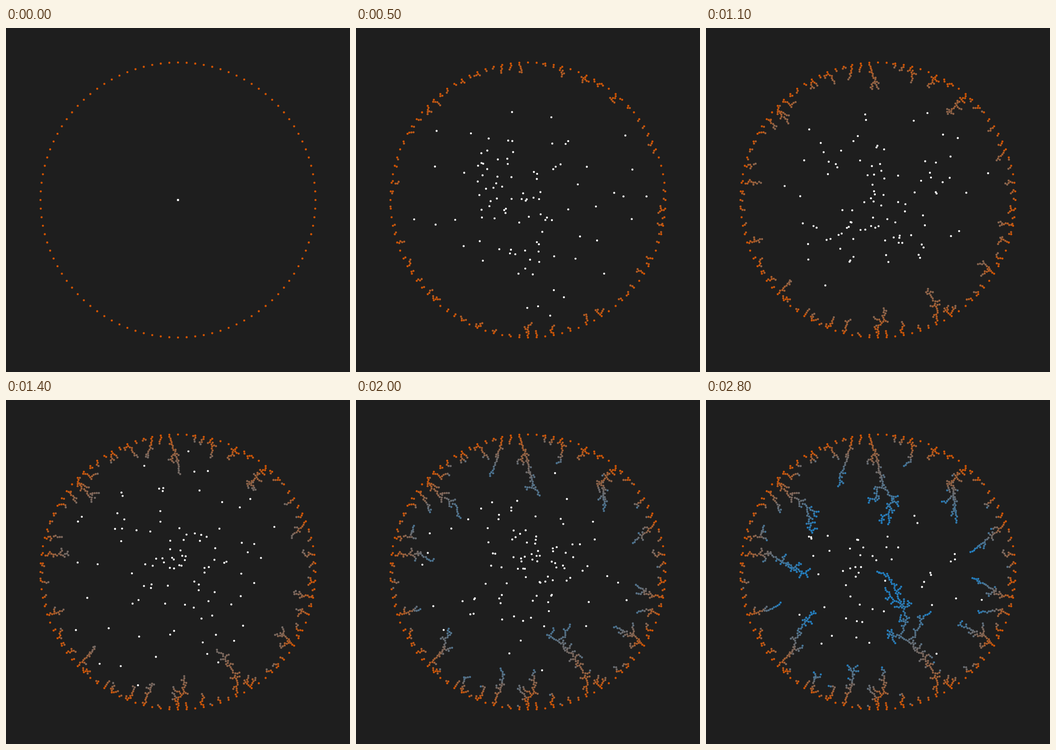
These frames come from a looping animation (748x748 px, 2.9 s). An HTML page:

```html
<!DOCTYPE html>
<html lang="en">
<head>
<meta charset="utf-8">
<title>Ring aggregation</title>
<style>
html, body { margin: 0; width: 100%; height: 100%; overflow: hidden; background: #1e1e1e; }
svg { display: block; width: 100vw; height: 100vh; }
</style>
</head>
<body>
<svg id="stage" viewBox="0 0 748 748"></svg>
<script>
const STEP = 100, FRAMES = 29, MID = 374, RADIUS = 299, SEEDS = 100;
const GAP = 4.6, RATE = 45, WALKERS = 100;
const stage = document.getElementById('stage');
const dots = [], trunks = [];

function random(seed) {
  return () => {
    seed = (seed + 0x6D2B79F5) | 0;
    let t = Math.imul(seed ^ (seed >>> 15), 1 | seed);
    t = (t + Math.imul(t ^ (t >>> 7), 61 | t)) ^ t;
    return ((t ^ (t >>> 14)) >>> 0) / 4294967296;
  };
}
const rnd = random(41);

const polar = (r, a) => ({ x: MID + r * Math.cos(a), y: MID + r * Math.sin(a) });

function nearest(x, y) {
  let best = Infinity, dot;
  for (const p of dots) {
    const d = (p.x - x) ** 2 + (p.y - y) ** 2;
    if (d < best) { best = d; dot = p; }
  }
  return { dot, dist: Math.sqrt(best) };
}

// A main branch: from a ring dot (by index) through key points, done at step `end`.
function trunk(seed, end, ...xy) {
  const pts = [polar(RADIUS, seed * 2 * Math.PI / SEEDS)];
  for (let i = 0; i < xy.length; i += 2) pts.push({ x: xy[i], y: xy[i + 1] });
  const chain = [];
  for (let i = 1; i < pts.length; i++) {
    const a = pts[i - 1], dx = pts[i].x - a.x, dy = pts[i].y - a.y;
    const len = Math.hypot(dx, dy), n = Math.round(len / (GAP * 0.92));
    for (let k = 1; k <= n; k++) {
      const off = (rnd() - 0.5) * 4 / len;
      chain.push({ x: a.x + dx * k / n - dy * off, y: a.y + dy * k / n + dx * off });
    }
  }
  chain.forEach((p, i) => {
    p.born = Math.ceil(1 + (end - 1) * Math.pow((i + 1) / chain.length, 0.8));
  });
  trunks.push(...chain);
}

trunk(74, 23, 369, 120, 384, 182, 410, 220);
trunk(72, 23, 311, 112, 290, 174);
trunk(62, 22, 166, 192, 235, 243);
trunk(60, 18, 152, 215, 157, 240);
trunk(54, 20, 116, 296, 127, 274);
trunk(52, 28, 141, 335, 205, 378);
trunk(45, 27, 132, 459, 163, 442);
trunk(38, 28, 188, 548, 203, 500, 234, 459);
trunk(33, 26, 235, 603, 250, 598);
trunk(29, 22, 314, 630, 324, 580);
trunk(25, 17, 374, 650, 352, 628);
trunk(18, 28, 502, 602, 460, 540, 425, 513, 437, 475, 410, 407);
trunk(9, 22, 604, 512, 553, 489);
trunk(5, 25, 640, 456, 594, 461);
trunk(3, 27, 640, 423, 580, 386);
trunk(94, 26, 628, 290, 580, 330);
trunk(86, 24, 535, 175, 545, 262);
trunk(79, 22, 447, 130, 431, 144);

// A walker drifts from the centre until it touches a dot and sticks there.
function drift(born) {
  let x = MID, y = MID;
  for (;;) {
    const { dot, dist } = nearest(x, y);
    if (dist < GAP + 0.8) {
      const k = GAP / dist;
      dots.push({ x: dot.x + (x - dot.x) * k, y: dot.y + (y - dot.y) * k, born });
      return;
    }
    const a = rnd() * 2 * Math.PI, jump = Math.max(0.8, dist - GAP);
    x += jump * Math.cos(a);
    y += jump * Math.sin(a);
    if (Math.hypot(x - MID, y - MID) > RADIUS + 3) x = y = MID;
  }
}

for (let i = 0; i < SEEDS; i++) {
  dots.push({ ...polar(RADIUS, i * 2 * Math.PI / SEEDS), born: 0 });
}
for (let step = 1; step < FRAMES; step++) {
  for (const p of trunks) {
    if (p.born === step && nearest(p.x, p.y).dist > 3.2) dots.push(p);
  }
  while (dots.length < SEEDS + RATE * (step - 0.4)) drift(step);
}

function make(tag, attrs) {
  const el = document.createElementNS('http://www.w3.org/2000/svg', tag);
  for (const key in attrs) el.setAttribute(key, attrs[key]);
  return stage.appendChild(el);
}

function tint(born) {
  const k = Math.min(1, born / 26), mix = (a, b) => Math.round(a + (b - a) * k);
  return `rgb(${mix(211, 36)},${mix(84, 126)},${mix(0, 190)})`;
}

for (const p of dots) {
  p.el = make('circle', { cx: p.x.toFixed(1), cy: p.y.toFixed(1), r: 2.3, fill: tint(p.born) });
}
const walkers = Array.from({ length: WALKERS }, () => make('circle', { r: 2.2, fill: '#fff' }));
const core = make('rect', { x: 371.8, y: 371.8, width: 4.4, height: 4.4, fill: '#fff' });

// Free walkers are dense at the centre, thin towards the ring, and run out at the end.
function scatter(frame) {
  const r = random(frame * 977 + 5), alive = dots.filter(p => p.born <= frame);
  const reach = (300 - 2 * frame) * Math.min(1, 0.6 + 0.2 * frame);
  const count = WALKERS - 3 * Math.max(0, frame - 24) ** 2;
  const blocked = p => alive.some(q => Math.hypot(q.x - p.x, q.y - p.y) < 8);
  walkers.forEach((el, i) => {
    const on = frame > 0 && i < count;
    el.style.display = on ? '' : 'none';
    if (!on) return;
    let p, tries = 0;
    do p = polar(reach * Math.sqrt(r() * r()), r() * 2 * Math.PI);
    while (blocked(p) && ++tries < 30);
    el.setAttribute('cx', p.x.toFixed(1));
    el.setAttribute('cy', p.y.toFixed(1));
  });
}

let shown = -1;
function draw(ms) {
  const frame = Math.floor(ms / STEP) % FRAMES;
  if (frame === shown) return;
  shown = frame;
  for (const p of dots) p.el.style.display = p.born <= frame ? '' : 'none';
  core.style.display = frame ? 'none' : '';
  scatter(frame);
}

const begin = performance.now();
function tick() {
  draw(performance.now() - begin);
  requestAnimationFrame(tick);
}
tick();
</script>
</body>
</html>
```
